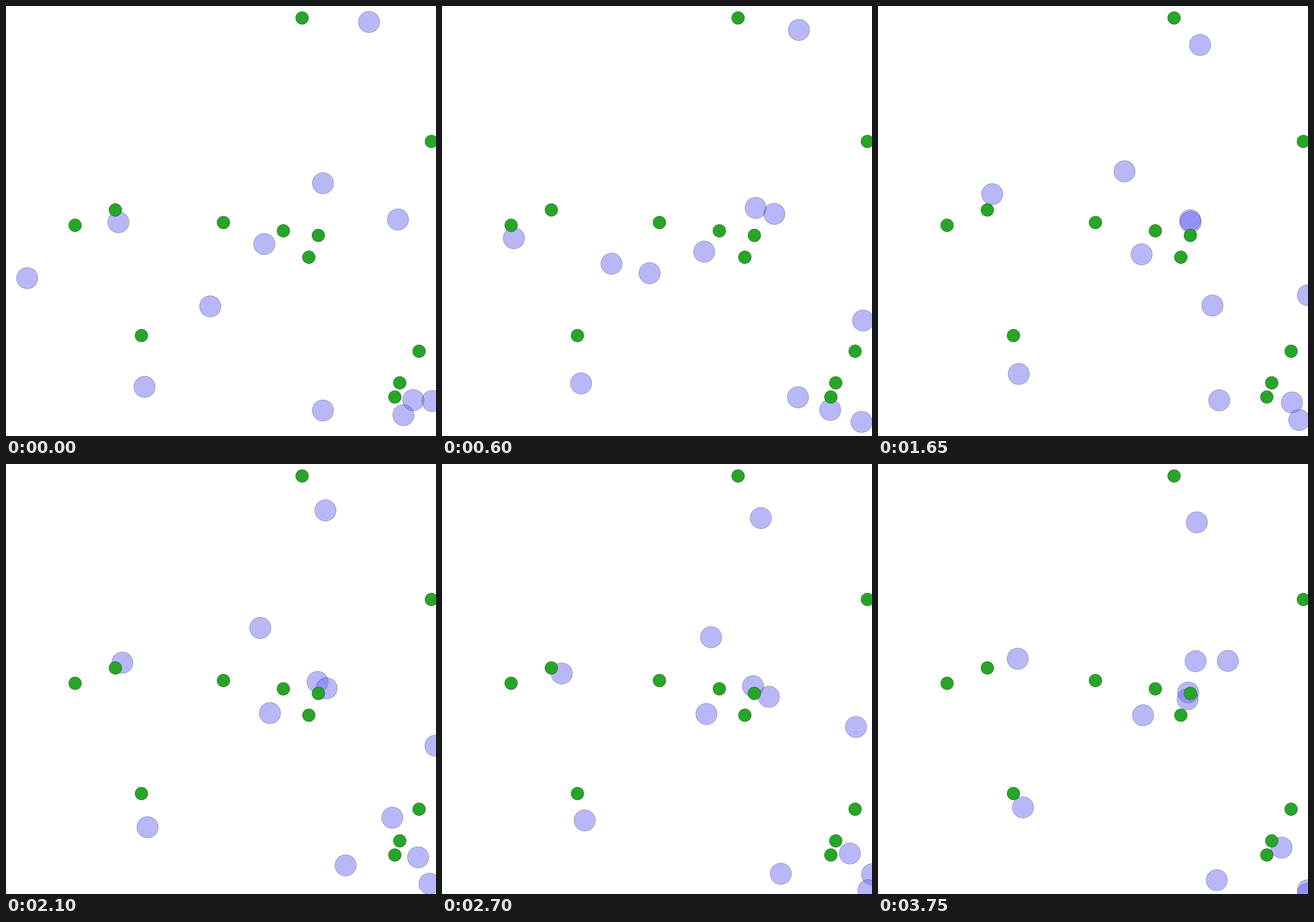
A matplotlib script that plays this animation: 700 by 700 pixels, repeating every 3900 ms.

```python
import numpy as np
import matplotlib.pyplot as plt
from matplotlib.animation import FuncAnimation
from matplotlib.patches import Circle

SIZE, FRAMES, STEP = 700, 26, 150
BLUE = (0.4, 0.4, 0.955, 0.46)
GREEN = (0.149, 0.651, 0.149)
EDGE = (0, 0, 0, 0.35)
TURNS = np.array([0, 4, 8, 18, 25])  # frames at which the roamers change course
LAST = FRAMES - 1


def drift(start, end, power):
    """Straight path that speeds up (power > 1) or slows down (power < 1)."""
    start, end = np.array(start), np.array(end)
    return lambda frame: start + (end - start) * (frame / LAST) ** power


def roam(*points):
    """Smooth path through one point per turn, kept inside the stage."""
    points = np.array(points, dtype=float)
    speed = np.gradient(points, TURNS, axis=0)

    def at(frame):
        k = min(np.searchsorted(TURNS, frame, side="right") - 1, len(TURNS) - 2)
        span = TURNS[k + 1] - TURNS[k]
        t = (frame - TURNS[k]) / span
        ease = t * t * (3 - 2 * t)
        swing = span * t * (1 - t) * (speed[k] * (1 - t) - speed[k + 1] * t)
        return np.clip(points[k] * (1 - ease) + points[k + 1] * ease + swing, 0, SIZE)

    return at


paths = [
    drift((225.5, 620), (236, 559), 1.3),
    drift((516, 288.5), (505, 372), 0.4),
    drift((420.5, 387.5), (431.5, 409), 0.3),
    roam((591, 26), (581, 39), (540, 52), (519, 88), (519, 95)),
    roam((638, 347.5), (541, 338.5), (510.5, 342.5), (532, 379), (504, 383)),
    roam((34.5, 443), (117, 378), (168, 315.5), (195, 341), (227.5, 317)),
    roam((332.5, 489), (338, 435), (381, 310.5), (438, 282), (517, 321)),
    roam((183, 352), (276, 419.5), (441, 431), (700, 668), (700, 694)),
    roam((516, 658.5), (579.5, 637), (562.5, 635.5), (551.5, 667), (551.5, 677.5)),
    roam((647, 666), (632, 657.5), (665, 650.5), (664, 634), (657, 624.5)),
    roam((694, 643), (683, 677), (683.5, 670.5), (694, 694), (700, 700)),
    roam((663, 641.5), (685.5, 512), (700, 485.5), (674, 428), (569.5, 320.5)),
]
spots = [
    (482, 19.5), (692.5, 220.5), (178, 332), (112.5, 357), (354, 352.5), (451.5, 366),
    (508.5, 373.5), (493, 409), (220.5, 536.5), (672.5, 562), (641, 613.5), (633, 636.5),
]

fig = plt.figure(figsize=(SIZE / 100, SIZE / 100), dpi=100, facecolor="white")
ax = fig.add_axes([0, 0, 1, 1])
ax.set(xlim=(0, SIZE), ylim=(SIZE, 0))
ax.axis("off")


def disc(xy, radius, color, width, layer):
    return ax.add_patch(Circle(xy, radius, fc=color, ec=EDGE, lw=width, zorder=layer))


walkers = [disc(path(0), 17.3, BLUE, 0.55, 1) for path in paths]
for spot in spots:
    disc(spot, 10.4, GREEN, 0.72, 2)


def update(frame):
    for walker, path in zip(walkers, paths):
        walker.center = path(frame)
    return walkers


anim = FuncAnimation(fig, update, frames=FRAMES, interval=STEP, repeat=True, repeat_delay=0)
plt.show()
```
